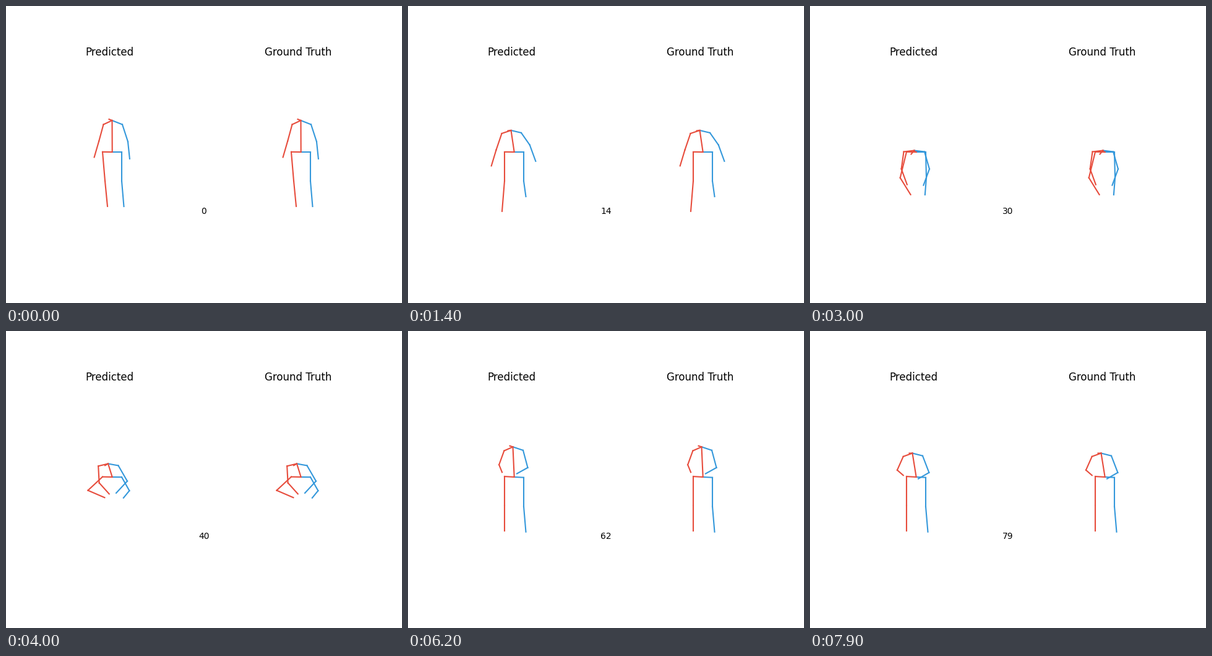
Write a matplotlib script that moves like this. It is 640x480 px and loops after 8 s.

```python
import numpy as np
import matplotlib.pyplot as plt
from matplotlib.animation import FuncAnimation

W, H, DPI = 640, 480, 100
FRAMES, STEP = 80, 100
RED, BLUE = "#e74c3c", "#3498db"
SHIFT = 305
ROOT = np.array([171.7, 236])
BEATS = (0, 14, 30, 40, 52, 62, 79)


def track(times, values):
    """Smooth curve through a few values, without overshoot."""
    t, v = np.array(times, float), np.array(values, float)
    h = np.diff(t)
    d = np.diff(v) / h
    a, b = d[:-1], d[1:]
    same = a * b > 0
    inner = np.where(same, 2 * a * b / np.where(same, a + b, 1), 0)
    m = np.concatenate([d[:1], inner, d[-1:]])

    def at(time):
        i = int(np.clip(np.searchsorted(t, time, "right") - 1, 0, len(h) - 1))
        s = (time - t[i]) / h[i]
        r = 1 - s
        return ((1 + 2 * s) * r * r * v[i] + (3 - 2 * s) * s * s * v[i + 1]
                + h[i] * s * r * (r * m[i] - s * m[i + 1]))

    return at


def ease(t, start, end):
    s = np.clip((t - start) / (end - start), 0, 1)
    return s * s * (3 - 2 * s)


def bump(t, center, width):
    return np.exp(-((t - center) / width) ** 2)


def ray(length, degrees, side):
    """Vector hanging down, turned outward to one side."""
    a = np.radians(degrees)
    return np.array([side * np.sin(a), np.cos(a)]) * length


neck_x = track(BEATS, (171.5, 166.5, 168.5, 165, 172.2, 169.5, 165.5))
neck_y = track((0, 14, 22, 27, 30, 40, 52, 55, 62, 72, 79),
               (185, 201, 191, 216, 233.5, 214.5, 196.5, 185, 187.3, 197.5, 197.5))
crouch = track((0, 23, 30, 33, 40, 45, 52, 56, 79),
               (0, 0, .27, .95, .62, .64, .22, 0, 0))
# Arm angles outward from straight down.
upper_r = track(BEATS, (15, 18, 8, -3, 23, 20, 24))
fore_r = track(BEATS, (16, 16, -20, -42, -29, -22, -49))
upper_l = track(BEATS, (18, 35, 16, 30, 39, 15, 21))
fore_l = track(BEATS, (6, 20, -20, -43, -42, -61, -60))


def chain(start, *parts):
    points = [start]
    for part in parts:
        points.append(points[-1] + part)
    return list(zip(points, points[1:]))


def pose(t):
    """Bones as (start, end), in the order of COLORS."""
    neck = np.array([neck_x(t), neck_y(t)])
    lean = np.clip((neck[1] - 185) / 49, 0, 1)
    c = crouch(t)
    fold = ease(t, 30, 64)
    stride = bump(t, 14, 5)
    swing = 12 * (bump(t, 6, 3) + bump(t, 19, 3))
    walk = 1 - ease(t, 14, 28)
    sway = np.cos(np.pi * t / 14)

    head = np.array([-5, 8 * lean - 2])
    arm_l = chain(neck, (16.5, 6.5 - 4.5 * np.sqrt(lean)),
                  ray(29 - 5 * stride, upper_l(t), 1),
                  ray(28 - 8 * fold, fore_l(t), 1))
    arm_r = chain(neck, (-14 - 3 * lean, 6.5 - 4.5 * lean),
                  ray(28 - 4 * fold, upper_r(t) + swing, -1),
                  ray(27 - 14 * fold, fore_r(t) + swing, -1))

    knee_y = 47 * np.cos(1.75 * c)
    foot_y = 41 * (1 - c) ** 1.3
    leg_l = chain(ROOT, (15.3, .7 * fold), (52 * c ** 3, knee_y),
                  (3.5 - 21 * c, foot_y - 16 * stride))
    leg_r = chain(ROOT, (-15.7, -.2 - .7 * fold),
                  (2 * walk * (1 + sway) - 38 * c, knee_y),
                  (4 * walk * sway + 27 * np.sin(2.5 * c), foot_y + 8 * stride))
    return [(ROOT, neck)] + arm_l + arm_r + leg_l + leg_r + [(neck, neck + head)]


COLORS = [RED] + ([BLUE] * 3 + [RED] * 3) * 2 + [RED]

plt.rcParams["font.family"] = "DejaVu Sans"
fig = plt.figure(figsize=(W / DPI, H / DPI), dpi=DPI, facecolor="white")
ax = fig.add_axes([0, 0, 1, 1])
ax.set(xlim=(0, W), ylim=(H, 0))
ax.axis("off")

for x, title in ((167.5, "Predicted"), (472.3, "Ground Truth")):
    ax.text(x, 80, title, size=12, ha="center", va="baseline")
counter = ax.text(319.8, 336, "0", size=10, ha="center", va="baseline")


def skeleton():
    return [ax.plot([], [], color=c, lw=1.5)[0] for c in COLORS]


figures = [(0, skeleton()), (SHIFT, skeleton())]


def draw(i):
    bones = pose(i)
    for dx, lines in figures:
        for line, (a, b) in zip(lines, bones):
            line.set_data([a[0] + dx, b[0] + dx], [a[1], b[1]])
    counter.set_text(str(i))
    return [counter] + figures[0][1] + figures[1][1]


anim = FuncAnimation(fig, draw, frames=FRAMES, interval=STEP,
                     repeat=True, repeat_delay=0, blit=False)
plt.show()
```
